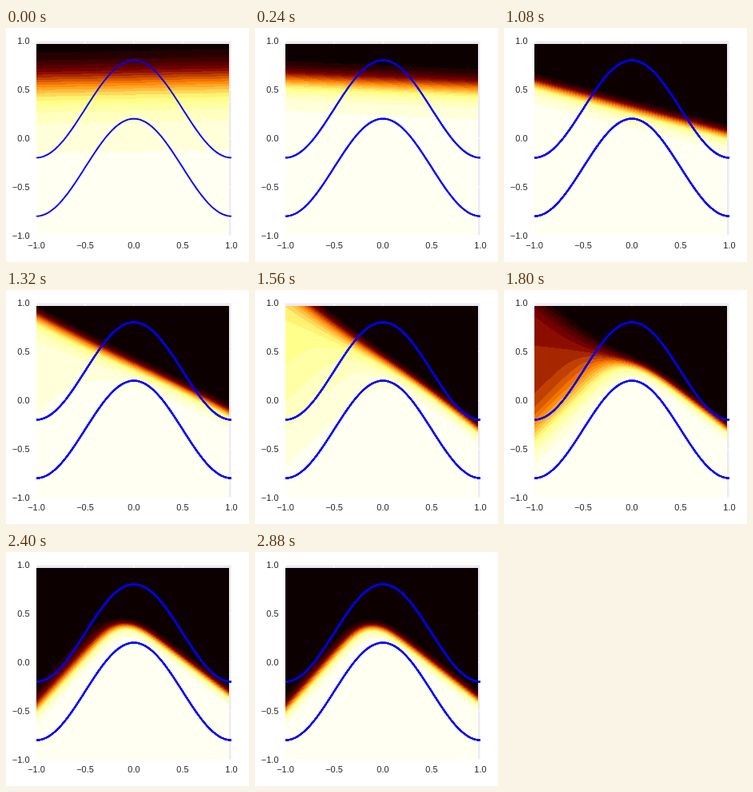
An HTML page with a canvas for the animation above (3000 ms loop, 304 px wide and 293 px high).

```html
<!DOCTYPE html>
<html>
<head>
<meta charset="utf-8">
<style>
html, body { margin: 0; overflow: hidden; background: #fff; }
canvas { display: block; }
</style>
</head>
<body>
<canvas id="stage" width="304" height="293"></canvas>
<script>
const ctx = document.getElementById('stage').getContext('2d');
const LEFT = 38, TOP = 16, SIZE = 244, UNIT = SIZE / 2;
const FIELD_TOP = 20, FIELD_W = 241, FIELD_H = 240;
const STEP_MS = 120, STEPS = 25, LEVELS = 20;
const TICKS = [-1, -0.5, 0, 0.5, 1];

// Two-unit network during training:
// step, bias, then weight, steepness, slope and height of each unit
const KEYS = [
  [0,  3.5, 13, 3, 0.02, 0.90,  0,   2.5, 0.9, 0.3],
  [2,  4,   13, 5, -0.045, 0.72, 0,  2.5, 0.9, 0.3],
  [6,  4.2, 16, 8, -0.125, 0.417, 0, 2.5, 0.9, 0.3],
  [9,  4.2, 16, 8, -0.27, 0.43, 0.3, 2.5, 0.9, 0.3],
  [13, 4.5, 16, 9, -0.80, 0.59, 3.4, 2.5, 0.9, 0.3],
  [17, 5.5, 16, 9, -0.74, 0.506, 8.3, 7.7, 1.08, 0.566],
  [24, 5.5, 14, 9, -0.78, 0.424, 12, 7, 1.12, 0.66]
];

const toPxX = x => LEFT + (x + 1) * UNIT;
const toPxY = y => TOP + (1 - y) * UNIT;
const sigmoid = u => 1 / (1 + Math.exp(-u));

// Black, red, orange, yellow, white ramp in flat bands
const PALETTE = Array.from({ length: LEVELS }, (_, i) => {
  const v = (i + 0.5) / LEVELS;
  return [2 * v, 2 * v - 0.5, 2 * v - 1].map(c => 255 * Math.min(1, Math.max(0, c)));
});

function paramsAt(step) {
  const next = Math.max(1, KEYS.findIndex(k => k[0] >= step));
  const a = KEYS[next - 1], b = KEYS[next];
  const f = (step - a[0]) / (b[0] - a[0]);
  return a.map((v, i) => v + (b[i] - v) * f).slice(1);
}

const image = ctx.createImageData(FIELD_W, FIELD_H);

function drawField(step) {
  const [bias, w1, k1, m1, h1, w2, k2, m2, h2] = paramsAt(step);
  let p = 0;
  for (let row = 0; row < FIELD_H; row++) {
    const y = 1 - (FIELD_TOP + row + 0.5 - TOP) / UNIT;
    for (let col = 0; col < FIELD_W; col++) {
      const x = (col + 0.5) / UNIT - 1;
      const value = sigmoid(bias
        - w1 * sigmoid(k1 * (y - m1 * x - h1))
        - w2 * sigmoid(k2 * (y - m2 * x - h2)));
      const color = PALETTE[Math.min(LEVELS - 1, Math.floor(value * LEVELS))];
      image.data[p++] = color[0];
      image.data[p++] = color[1];
      image.data[p++] = color[2];
      image.data[p++] = 255;
    }
  }
  ctx.putImageData(image, LEFT, FIELD_TOP);
}

function drawAxes() {
  ctx.fillStyle = '#fff';
  ctx.fillRect(0, 0, 304, 293);
  ctx.fillStyle = '#eaeaf2';
  ctx.fillRect(LEFT, TOP, SIZE, SIZE);
  ctx.fillStyle = '#fff';
  for (const t of TICKS) {
    ctx.fillRect(Math.round(toPxX(t)) - 0.5, TOP, 1, SIZE);
    ctx.fillRect(LEFT, Math.round(toPxY(t)) - 0.5, SIZE, 1);
  }
  ctx.fillStyle = '#262626';
  ctx.font = '11px "Liberation Sans", Arial, sans-serif';
  for (const t of TICKS) {
    const label = t.toFixed(1).replace('-', '\u2212');
    ctx.textAlign = 'center';
    ctx.fillText(label, toPxX(t), 276);
    ctx.textAlign = 'right';
    ctx.fillText(label, 29.5, toPxY(t) + 3.5);
  }
}

function drawCurve(offset) {
  ctx.beginPath();
  for (let x = -1; x <= 1.001; x += 0.02) {
    ctx.lineTo(toPxX(x), toPxY(offset + 0.5 * Math.cos(Math.PI * x)));
  }
  ctx.stroke();
}

function draw(step) {
  drawAxes();
  drawField(step);
  ctx.save();
  ctx.beginPath();
  ctx.rect(LEFT, TOP, SIZE, SIZE);
  ctx.clip();
  ctx.strokeStyle = '#00f';
  ctx.lineWidth = 1.94;
  ctx.lineJoin = 'round';
  // Curves are overplotted at each step, which hardens their edges
  for (let i = 0; i <= Math.min(step, 6); i++) {
    drawCurve(0.3);
    drawCurve(-0.3);
  }
  ctx.restore();
}

let shown = -1;
function tick() {
  const step = Math.floor(performance.now() / STEP_MS) % STEPS;
  if (step !== shown) draw(shown = step);
  requestAnimationFrame(tick);
}
tick();
</script>
</body>
</html>
```
